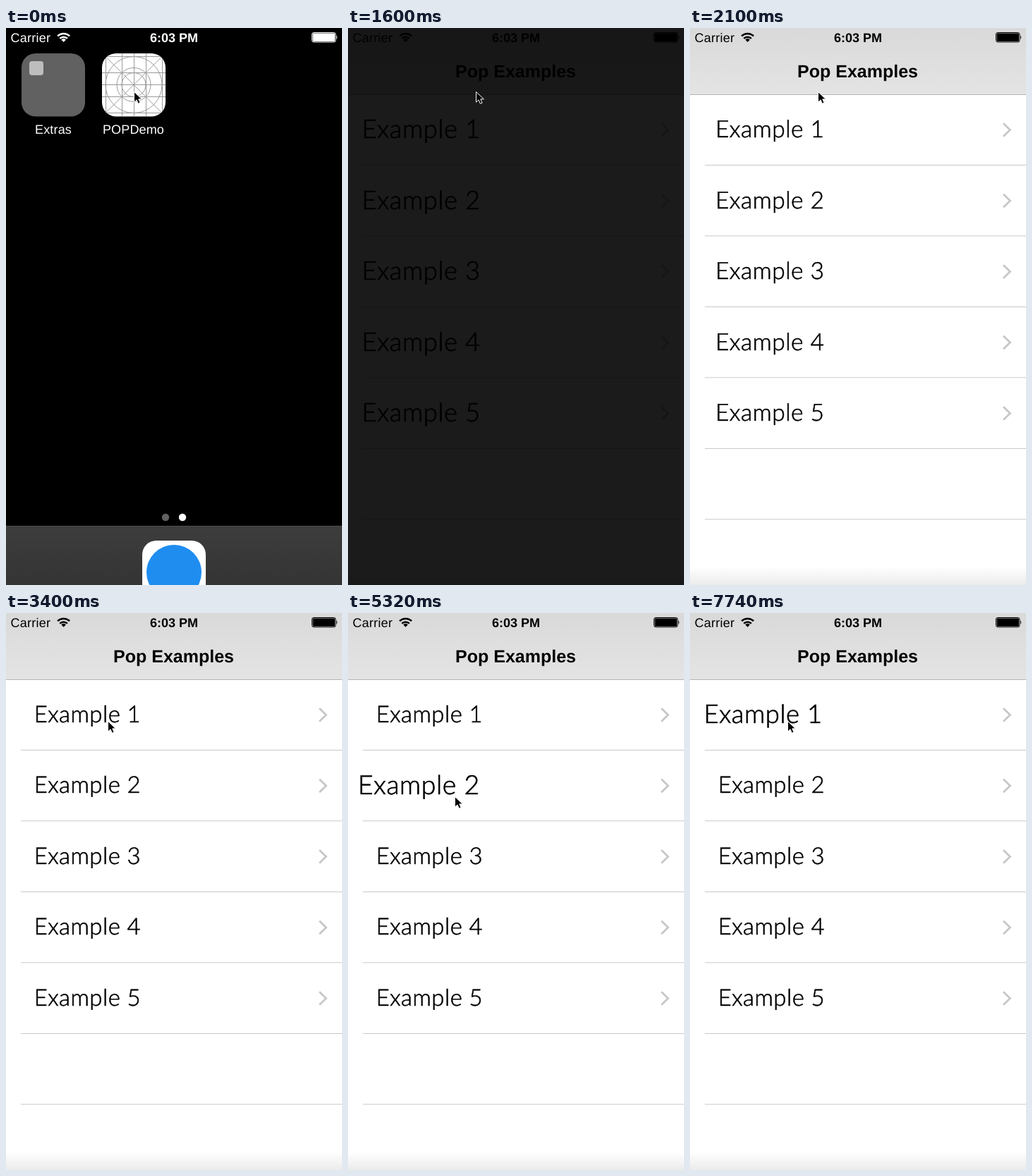
Animation, 476 px wide and 790 px high, one loop 8000 ms. Source, as an HTML page:

```html
<!DOCTYPE html>
<html lang="en">
<head>
<meta charset="utf-8">
<title>Pop Examples</title>
<style>
  html, body { margin: 0; width: 100%; height: 100%; overflow: hidden; background: #000; }
  svg { display: block; width: 476px; height: 790px; }
  text { font-family: "Liberation Sans", Arial, sans-serif; font-size: 18px; text-rendering: geometricPrecision; white-space: pre; }
  .bold { font-weight: 700; }
  .title { font-size: 25px; }
  .row text { font-family: Lato, sans-serif; font-weight: 300; font-size: 36.5px; letter-spacing: .5px; stroke: #000; stroke-width: .65px; }
  .mid { text-anchor: middle; }
</style>
</head>
<body>
<svg viewBox="0 0 476 790">
  <defs>
    <linearGradient id="dock" x2="0" y2="1">
      <stop stop-color="#3d3d3d"/><stop offset="1" stop-color="#2e2e2e"/>
    </linearGradient>
    <linearGradient id="bar" x2="0" y2="1">
      <stop stop-color="#d9d9d9"/><stop offset="1" stop-color="#e4e4e4"/>
    </linearGradient>
    <linearGradient id="foot" x2="0" y2="1">
      <stop stop-color="#fff"/><stop offset="1" stop-color="#ebebeb"/>
    </linearGradient>
    <clipPath id="tile"><rect x="136" y="36" width="90" height="89.5" rx="20"/></clipPath>
    <g id="status">
      <text x="6.5" y="20" letter-spacing=".25">Carrier</text>
      <g fill="none" stroke="currentColor" stroke-width="2.6">
        <path d="M73.1 11.4a12.2 12.2 0 0 1 17 0M76.3 14.9a7.6 7.6 0 0 1 10.6 0"/>
      </g>
      <path d="M81.6 20l-3.3-3.4a4.8 4.8 0 0 1 6.6 0z"/>
      <text x="238" y="20" class="bold mid">6:03 PM</text>
      <rect x="433.5" y="6.5" width="33.5" height="13.5" rx="2.5" fill="none" stroke="currentColor"/>
      <rect x="434.6" y="7.6" width="31.3" height="11.3" rx="1"/>
      <path d="M468.3 10.5q2 2.7 0 5.4z"/>
    </g>
  </defs>

  <g id="home">
    <rect x="22" y="36" width="90" height="89.5" rx="20" fill="#616161"/>
    <rect x="33" y="47" width="20" height="20" rx="4" fill="#bdbdbd"/>
    <g clip-path="url(#tile)">
      <rect x="136" y="36" width="90" height="90" fill="#fff"/>
      <g id="grid" fill="none" stroke="#999"></g>
      <rect id="dim" x="136" y="36" width="90" height="90" opacity="0"/>
    </g>
    <g fill="#fff" class="mid">
      <text x="67" y="150" letter-spacing=".15">Extras</text>
      <text x="180.5" y="150" letter-spacing=".15">POPDemo</text>
    </g>
    <circle cx="226" cy="694" r="5.2" fill="#616161"/>
    <circle cx="250" cy="694" r="5.2" fill="#fff"/>
    <rect y="706" width="476" height="140" fill="url(#dock)"/>
    <rect y="706" width="476" height="1" fill="#4c4c4c"/>
    <rect x="193" y="727" width="90" height="90" rx="20" fill="#fff"/>
    <circle cx="238" cy="772" r="39" fill="#1f8df0"/>
  </g>
  <rect id="launch"/>
  <use id="homeStatus" href="#status" fill="#fff" color="#fff"/>

  <g id="app">
    <rect width="476" height="790" fill="#fff"/>
    <rect y="764" width="476" height="26" fill="url(#foot)"/>
    <rect width="476" height="94" fill="url(#bar)"/>
    <rect y="94" width="476" height="1" fill="#b4b4b4"/>
    <use href="#status" fill="#000" color="#000"/>
    <text x="237.5" y="70" class="title bold mid">Pop Examples</text>
    <g id="rows"></g>
    <rect id="shade" width="476" height="790"/>
  </g>

  <path id="cursor" d="M.5 .5V15.2L4 11.9L6.4 17.3L9.1 16.1L6.8 10.9H11.4Z" stroke="#fff"/>
</svg>

<script>
const LOOP = 8000, PIVOT = 222, REST = 0.9;
const $ = id => document.getElementById(id);
const rowY = i => 144 + i * 100.5;
const clamp = v => Math.min(1, Math.max(0, v));
const span = (t, a, b) => clamp((t - a) / (b - a));
const ease = p => (1 - Math.cos(Math.PI * p)) / 2;
const mix = (a, b, p) => a + (b - a) * p;

// Per row: [time, "press"] or [time, "free", scale at release]
const opening = [1700, "free", 1];
const events = [
  [opening, [3810, "press"], [3915, "free", 1], [7630, "press"]],
  [opening, [5000, "press"], [5303, "free", 1]],
  [opening, [6130, "free", 0.906]],
  [opening],
  [opening]
];

// Pointer moves: start, end, target x and y, optional bezier control point
const moves = [
  [2420, 2840, 244, 187],
  [3200, 3400, 144, 153],
  [4100, 4500, 151, 260],
  [5450, 5850, 144, 326],
  [6600, 7060, 138, 153, 245, 190]
];

function build() {
  let grid = "";
  for (const d of [-40, -17, 0, 17, 40])
    grid += `M${181.5 + d} 36V126M136 ${80.5 + d}H226`;
  grid += "M136 35.5L226 125.5M226 35.5L136 125.5";
  $("grid").innerHTML = `<path d="${grid}"/>` +
    [40, 24, 17].map(r => `<circle cx="181" cy="80.5" r="${r}"/>`).join("");

  let rows = "";
  for (let i = 0; i < 6; i++) {
    const y = rowY(i);
    rows += `<rect x="21" y="${y + 50}" width="455" height=".75" fill="#b7b7b9"/>`;
    if (i < 5) rows += `<g class="row"><text x="19.5" y="${y + 12}">Example ${i + 1}</text></g>` +
      `<path d="M444 ${y - 8.7}l9.5 9.2l-9.5 9.2" fill="none" stroke="#c6c6c9" stroke-width="2.7"/>`;
  }
  $("rows").innerHTML = rows;
}

// Underdamped spring settling at REST, starting speed 2 per second
function spring(from, ms) {
  const s = ms / 1000, decay = 5.545, freq = 17.65, x = from - REST;
  return REST + Math.exp(-decay * s) *
    (x * Math.cos(freq * s) + (2 + decay * x) / freq * Math.sin(freq * s));
}

function scaleAt(list, t) {
  const last = list.filter(e => e[0] <= t).pop();
  if (!last) return 1;
  const [start, kind, from] = last;
  return kind === "press" ? mix(REST, 1, ease(span(t, start, start + 100))) : spring(from, t - start);
}

function pointerAt(t) {
  let x = 181, y = 90;
  for (const [a, b, tx, ty, cx = (x + tx) / 2, cy = (y + ty) / 2] of moves) {
    if (t < a) break;
    const p = ease(span(t, a, b));
    x = mix(mix(x, cx, p), mix(cx, tx, p), p);
    y = mix(mix(y, cy, p), mix(cy, ty, p), p);
  }
  return [x, y];
}

function setAttrs(el, attrs) {
  for (const k in attrs) el.setAttribute(k, attrs[k]);
}

build();
const labels = [...document.querySelectorAll(".row")];

function draw(t) {
  // Home screen zooms through the tapped icon into a black launch image
  const zoom = 1 - (1 - span(t, 250, 660)) ** 2.2;
  const k = mix(1, 476 / 90, zoom);
  const cx = mix(181, 238, zoom), cy = mix(80.5, 422, zoom);
  const w = mix(90, 476, zoom), h = mix(89.5, 846, zoom);
  $("dim").setAttribute("opacity", 0.5 * span(t, 10, 90));
  setAttrs($("home"), {
    transform: `translate(${cx} ${cy}) scale(${k}) translate(-181 -80.5)`,
    opacity: 1 - span(t, 300, 640)
  });
  setAttrs($("launch"), {
    x: cx - w / 2, y: cy - h / 2, width: w, height: h,
    rx: mix(20, 0, zoom), opacity: span(t, 250, 450)
  });
  $("homeStatus").setAttribute("opacity", mix(1, 0.07, span(t, 260, 650)));

  $("app").setAttribute("visibility", t < 1595 ? "hidden" : "visible");
  $("shade").setAttribute("opacity", 1 - span(t, 1580, 1780));
  labels.forEach((g, i) => {
    const y = rowY(i), s = scaleAt(events[i], t);
    g.setAttribute("transform", `translate(${PIVOT} ${y}) scale(${s}) translate(${-PIVOT} ${-y})`);
  });
  const [px, py] = pointerAt(t);
  $("cursor").setAttribute("transform", `translate(${Math.round(px)} ${Math.round(py)})`);
}

const begin = performance.now();
function tick() {
  draw((performance.now() - begin) % LOOP);
  requestAnimationFrame(tick);
}
tick();
</script>
</body>
</html>
```
